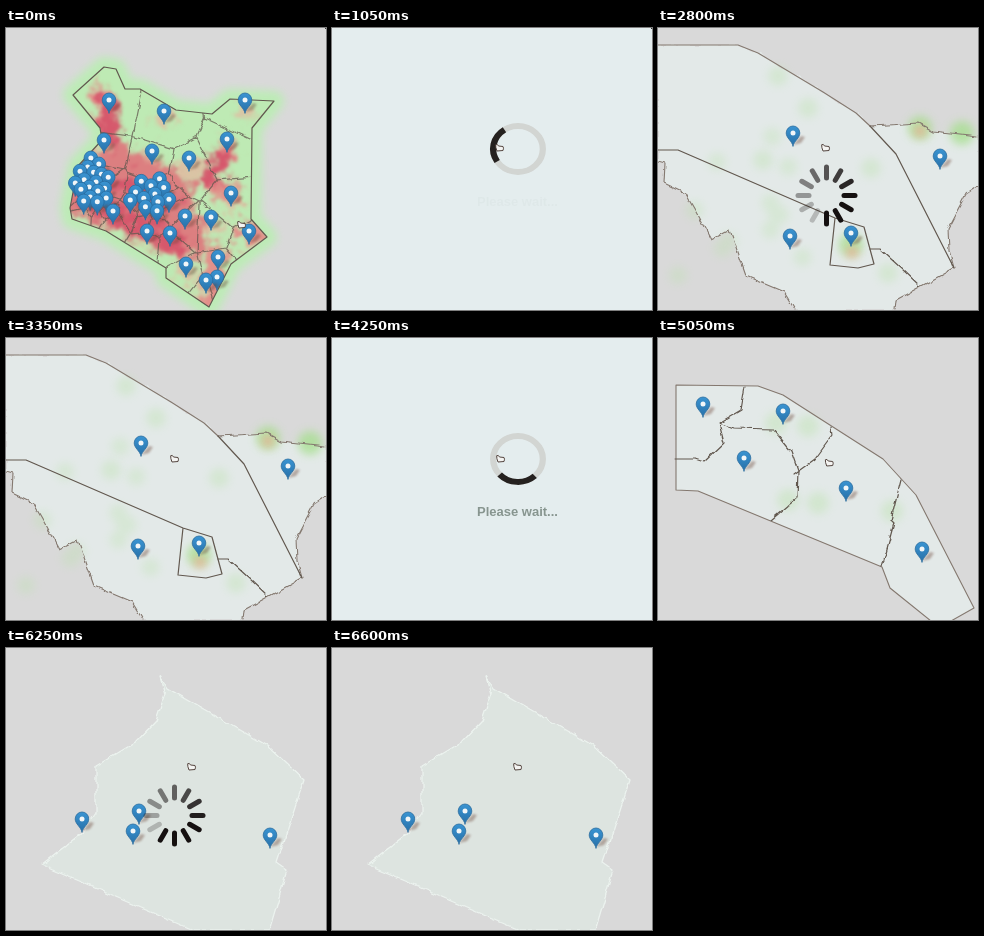
Write an HTML page that moves like this. It is 320 px wide and 282 px high and loops after 6750 ms.

```html
<!DOCTYPE html>
<html lang="en">
<head>
<meta charset="utf-8">
<style>
html, body { margin: 0; width: 100%; height: 100%; overflow: hidden; background: #d9d9d9; }
svg { display: block; width: 320px; height: 282px; }
path { stroke-linejoin: round; stroke-linecap: round; }
text { font: bold 13px "Liberation Sans", Arial, sans-serif; fill: #87958f; }
.line { fill: none; stroke: #62584f; stroke-width: 1.2; }
.edge { fill: none; stroke: #84786f; stroke-width: 1.1; }
.paper { fill: #e3e9e8; }
.rough { filter: url(#rough); }
</style>
</head>
<body>
<svg viewBox="0 0 320 282">
  <defs>
    <filter id="soft" x="-50%" y="-50%" width="200%" height="200%"><feGaussianBlur stdDeviation="4"/></filter>
    <filter id="shade" x="-50%" y="-50%" width="200%" height="200%"><feGaussianBlur stdDeviation="1"/></filter>
    <filter id="rough" filterUnits="userSpaceOnUse" x="-10" y="-10" width="340" height="302" color-interpolation-filters="sRGB">
      <feTurbulence type="fractalNoise" baseFrequency=".09" numOctaves="2" result="noise"/>
      <feDisplacementMap in="SourceGraphic" in2="noise" scale="6" xChannelSelector="R" yChannelSelector="G"/>
    </filter>
    <filter id="heat" filterUnits="userSpaceOnUse" x="-10" y="-10" width="340" height="302" color-interpolation-filters="sRGB">
      <feTurbulence type="fractalNoise" baseFrequency=".07" numOctaves="3" seed="4" result="noise"/>
      <feGaussianBlur in="SourceGraphic" stdDeviation="3"/>
      <feDisplacementMap in2="noise" scale="34" xChannelSelector="R" yChannelSelector="G"/>
      <feGaussianBlur stdDeviation="1"/>
    </filter>
    <linearGradient id="blue" x2="0" y2="1"><stop stop-color="#3a94d2"/><stop offset="1" stop-color="#2870a8"/></linearGradient>
    <g id="pin">
      <path d="M0 11L8 2L12 3L8 9Z" fill="#6b4438" opacity=".4" filter="url(#shade)"/>
      <path d="M0 12C-1 7-6.8 4-6.8-1A6.8 7 0 0 1 6.8-1C6.8 4 1 7 0 12Z" fill="url(#blue)" stroke="#2a6d9f" stroke-width=".8"/>
      <circle cy="-1" r="2.5" fill="#f2f6f8"/>
    </g>
  </defs>
  <g id="country"></g>
  <g id="county"></g>
  <g id="district"></g>
  <g id="ward"></g>
  <g id="wait">
    <rect width="320" height="282" fill="#e4edee"/>
    <g transform="translate(186 121) scale(1.08 1)" fill="none" stroke-width="5.8">
      <circle r="23" stroke="#d2d5d2"/>
      <circle id="arc" r="23" stroke="#25211f" pathLength="360" stroke-dasharray="90 270"/>
    </g>
    <text id="label" x="145" y="178">Please wait...</text>
  </g>
  <g id="spin" transform="translate(168.5 167.5)" stroke="#151010" stroke-width="5"></g>
  <path id="hand" d="M-3-2.5Q-1.5-3.5-.5-1L4-.5Q5 1 4 3.5L-2 4L-3 1Z" fill="#f4f4f2" stroke="#554640"/>
  <rect id="corner" x="319" width="1" height="1" fill="#333"/>
</svg>
<script>
const $ = id => document.getElementById(id);
const path = (d, attrs) => `<path d="M${d}" ${attrs}/>`;
const kind = name => `class="${name}"`;
const pins = list => list.map(([x, y]) => `<use href="#pin" x="${x}" y="${y}"/>`).join('');
const blobs = (list, color, r, opacity) => `<g fill="${color}" opacity="${opacity}" filter="url(#soft)">` +
  list.map(([x, y]) => `<circle cx="${x}" cy="${y}" r="${r}"/>`).join('') + '</g>';

let seed = 7;
const random = () => (seed = seed * 16807 % 2147483647) / 2147483647;
const scatter = (n, x, y, w, h) => Array.from({ length: n }, () => [x + random() * w, y + random() * h]);

// Sunflower arrangement of n points in an ellipse
const cluster = (n, x, y, rx, ry) => Array.from({ length: n }, (_, i) => {
  const r = Math.sqrt((i + .5) / n), a = i * 2.4;
  return [x + rx * r * Math.cos(a), y + ry * r * Math.sin(a)];
});

// Everything nearer to p than to any other point, as a polygon
function cell(p, all) {
  let shape = [[0, 0], [320, 0], [320, 282], [0, 282]];
  for (const q of all) {
    if (q === p) continue;
    const side = v => [0, 1].reduce((sum, k) => sum + (v[k] - (p[k] + q[k]) / 2) * (q[k] - p[k]), 0);
    shape = shape.flatMap((a, i) => {
      const b = shape[(i + 1) % shape.length], s = side(a), e = side(b), f = s / (s - e);
      const kept = s <= 0 ? [a] : [];
      return s * e < 0 ? [...kept, [a[0] + (b[0] - a[0]) * f, a[1] + (b[1] - a[1]) * f]] : kept;
    });
  }
  return shape;
}

function drawCountry() {
  const land = '67 67L98 39L110 41L119 61H134L170 82L206 86L224 71L268 73L246 100L245 191L261 209L225 236L203 279L160 250V240L100 203L66 191L64 180L72 138L96 112L94 100Z';
  const lone = [[103,73],[239,73],[158,84],[221,112],[98,113],[146,124],[183,131],[225,166],[107,184],[179,189],
    [205,190],[141,204],[164,206],[243,204],[212,230],[180,237],[211,250],[200,253]];
  const towns = [...lone, ...cluster(18, 87, 155, 18, 26), ...cluster(12, 144, 167, 24, 18)].sort((a, b) => a[1] - b[1]);
  const spots = towns.map(([x, y]) => [x, y + 12]);
  const warm = (d, width, color) => path(d, `fill="none" stroke="${color}" stroke-width="${width}"`);
  const cells = spots.map(p => cell(p, spots).join('L') + 'Z').join('M');
  return path(land, 'fill="#b8efb0" stroke="#b8efb0" stroke-width="20" opacity=".85" filter="url(#soft)"') +
    path(land, 'fill="#c0eab5" opacity=".8"') +
    `<clipPath id="land">${path(land, '')}</clipPath><g clip-path="url(#land)"><g filter="url(#heat)">` +
    lone.map(([x, y]) => `<circle cx="${x}" cy="${y + 8}" r="10" fill="#e8b09c" opacity=".7"/>`).join('') +
    warm('92 68L106 112M224 122L200 152L225 165M210 225L206 275M235 205H250', 20, '#e2908a') +
    warm('76 165L115 180L178 208M110 140L165 165', 46, '#dc7f80') +
    warm('102 80L106 108M80 168L115 190L170 215M110 155L160 170M216 128L202 152', 20, '#d6586c') +
    `</g>${path(cells, kind('"line rough"'.slice(1, -1)) + ' opacity=".75"')}</g>` +
    path(land, kind('line')) + pins(towns);
}

function drawCounty() {
  const north = '0 17L80 17L100 25L165 64L198 85L212 98';
  const east = 'L230 97L260 95L275 103L320 108';
  const right = '320 158L308 166L290 200L291 222L296 240';
  const corner = 'L238 272L237 282';
  const west = '137 282L126 264L88 248L72 202L53 212L38 184L27 165L6 155L7 136L0 134';
  return path(`${north + east}L${right + corner}L${west}`, kind('paper rough')) +
    blobs(scatter(12, 20, 100, 135, 160), '#b9e2aa', 9, .3) +
    blobs([[105,132], [213,140], [120,48], [150,80], [230,245]], '#b9e2aa', 10, .35) +
    blobs([[262,100], [304,105], [193,217]], '#a5df8d', 12, .75) +
    blobs([[262,103], [194,224]], '#f0ac96', 6, .8) +
    path(north, kind('edge')) + path(`212 98${east}M${right + corner}M${west}`, kind('edge rough')) +
    path('212 98L238 126L296 240M0 122H20L177 190L206 199L216 236L200 240L172 237L177 190', kind('line')) +
    path('212 221H222L243 240L262 258', kind('line rough')) +
    pins([[135,106], [282,129], [132,209], [193,206]]);
}

function drawDistrict() {
  const strip = '18 47L100 48L125 57L225 121L258 157L316 270L293 283H273L232 250L224 229L40 153L18 152Z';
  return path(strip, kind('paper')) +
    blobs([[130,162], [160,165], [150,88], [118,85], [234,173]], '#b9e2aa', 11, .4) +
    path(strip, kind('edge')) +
    path('87 48L83 72L61 85L66 105L46 124L37 121H18M61 85L75 90L115 91L133 113L140 133L139 160L112 183M173 89L174 98L157 121L135 137M243 142L233 182L236 185L224 229', kind('line rough')) +
    pins([[45,67], [125,74], [86,121], [188,151], [264,212]]);
}

function drawWard() {
  return path('154 29L161 40L262 98L298 132L271 215L281 222L263 283H189L35 217L77 184L90 165V118L130 94L150 73L159 46Z',
      'class="rough" fill="#dde4e0" stroke="#ebf2ee" stroke-width="1.3"') +
    pins([[133,164], [76,172], [127,184], [264,188]]);
}

$('country').innerHTML = drawCountry();
$('county').innerHTML = drawCounty();
$('district').innerHTML = drawDistrict();
$('ward').innerHTML = drawWard();

const bars = 12;
for (let i = 0; i < bars; i++)
  $('spin').innerHTML += path('17.5 0H28.5', `transform="rotate(${i * 360 / bars})"`);

// Pointer moves: start, end, x, y, downward bend
const moves = [[0, 800, 167, 119, 0], [3050, 3350, 168, 120, 0], [5000, 5600, 185, 118, 9]];

function pointer(t) {
  let x = 235, y = 196;
  for (const [start, end, toX, toY, bend] of moves) {
    const p = Math.min(1, Math.max(0, (t - start) / (end - start)));
    const e = 1 - (1 - p) ** 2;
    x += (toX - x) * e;
    y += (toY - y) * e + bend * Math.sin(Math.PI * e);
  }
  return `translate(${x} ${y})`;
}

const show = (id, on) => $(id).style.display = on ? '' : 'none';
const within = (t, spans) => spans.find(([a, b]) => t >= a && t < b);

function draw(now) {
  const t = Math.floor(now % 6750 / 50) * 50;
  show('country', t < 1050);
  show('county', t >= 2450 && t < 3650);
  show('district', t >= 4350 && t < 5850);
  show('ward', t >= 5850);
  show('corner', t < 2450);

  const wait = within(t, [[1050, 2450], [3650, 4350]]);
  show('wait', wait);
  if (wait) {
    const age = t - wait[0];
    $('arc').setAttribute('transform', `rotate(${147 + age * 456 / 1050})`);
    $('label').style.opacity = Math.min(1, .05 + age / 300);
  }

  const spin = within(t, [[2450, 2950], [4350, 4650], [5850, 6600]]);
  show('spin', spin);
  if (spin) [...$('spin').children].forEach((bar, i) => {
    const lag = ((t - spin[0] - 50) / 1000 - i / bars + 2) % 1;
    bar.style.opacity = Math.max(.22, 1 - Math.max(0, lag - .3) * 1.25);
  });

  $('hand').setAttribute('transform', pointer(t));
}

const start = performance.now();
function loop() {
  draw(performance.now() - start);
  requestAnimationFrame(loop);
}
loop();
</script>
</body>
</html>
```
